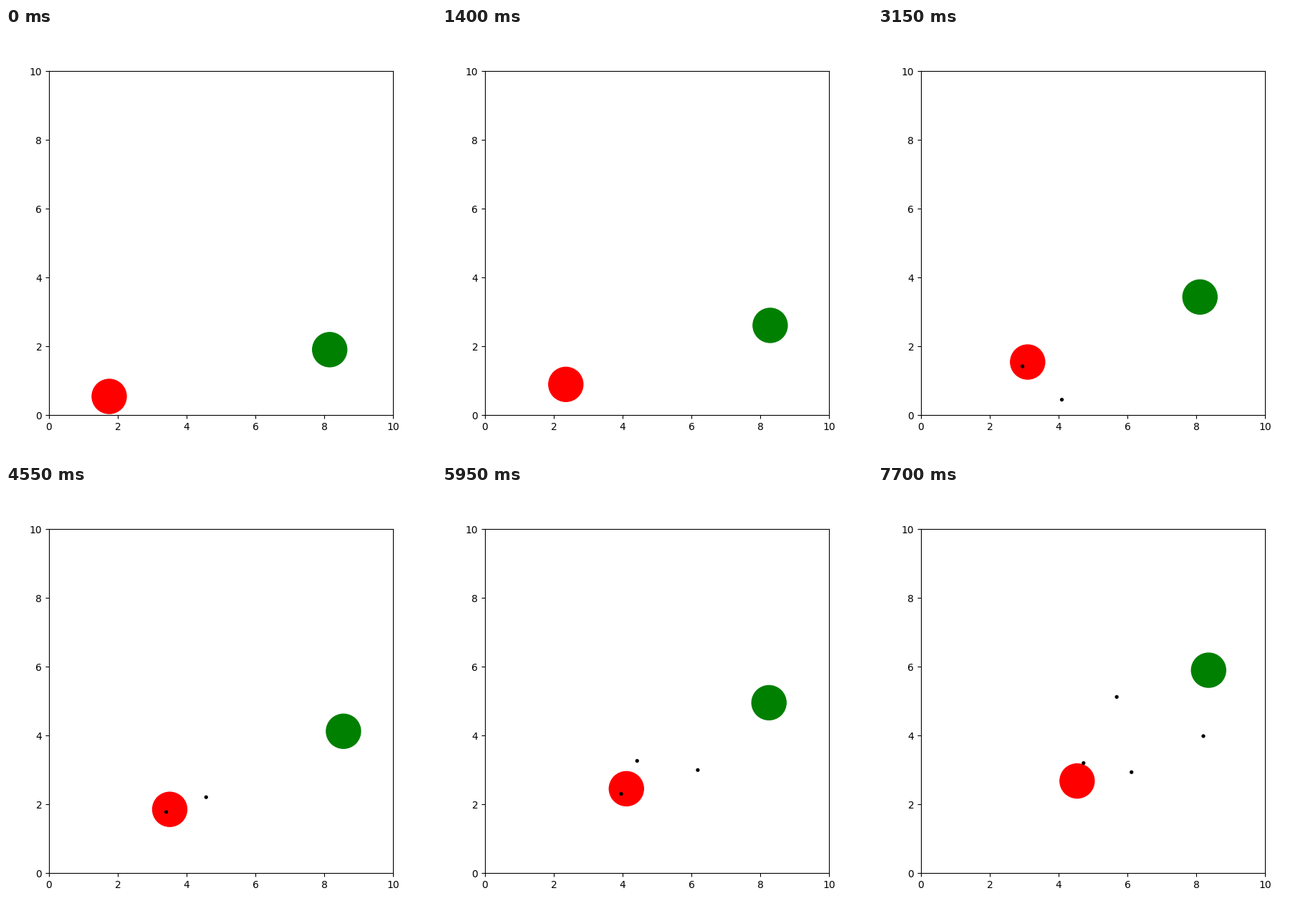
Write a matplotlib script that moves like this. It is 600 px wide and 600 px high and loops after 8000 ms.

```python
import numpy as np
import matplotlib.pyplot as plt
from matplotlib.animation import FuncAnimation
from matplotlib.patches import Circle

INTERVAL, LOOP, STEP = 50, 8000, 350
SPEED = 0.45       # distance a shot flies per step
RELOAD = 4         # steps between shots, the first at step 1

# Both balls move straight between the steps at which they turn.
TURNS = [0, 4, 5, 9, 13, 17, 20, 22]
RED = ([1.75, 2.35, 2.5, 3.1, 3.51, 4.11, 4.53, 4.538],
       [0.54, 0.89, 1.04, 1.54, 1.85, 2.45, 2.79, 2.675])
GREEN = ([8.16, 8.29, 8.13, 8.11, 8.56, 8.255, 8.43, 8.36],
         [1.9, 2.605, 2.73, 3.43, 4.12, 4.95, 5.625, 5.895])
ANGLES = np.radians([-28, -14.3, 26, 55.7, 16.3, 64.3])


def position(path, step):
    return np.array([np.interp(step, TURNS, axis) for axis in path])


def add_ball(radius, color):
    return ax.add_patch(Circle((0, 0), radius, color=color))


fig = plt.figure(figsize=(6, 6), dpi=100)
ax = fig.add_axes([0.1, 0.1, 0.8, 0.8])
ax.set(xlim=(0, 10), ylim=(0, 10))

red = add_ball(0.5, "red")
green = add_ball(0.5, "green")
shots = [add_ball(0.04, "black") for _ in ANGLES]


def update(frame):
    step = frame * INTERVAL // STEP
    red.center = position(RED, step)
    green.center = position(GREEN, step)
    for i, (shot, angle) in enumerate(zip(shots, ANGLES)):
        age = step - (RELOAD * i + 1)
        heading = np.array([np.cos(angle), np.sin(angle)])
        # A shot leaves from where the red ball was one step earlier.
        pos = position(RED, RELOAD * i) + SPEED * age * heading
        shot.center = pos
        inside = np.all((pos > 0.05) & (pos < 9.95))
        shot.set_visible(bool(age >= 0 and inside))
    return [red, green, *shots]


anim = FuncAnimation(fig, update, frames=LOOP // INTERVAL,
                     interval=INTERVAL, repeat=True, repeat_delay=0)
plt.show()
```
